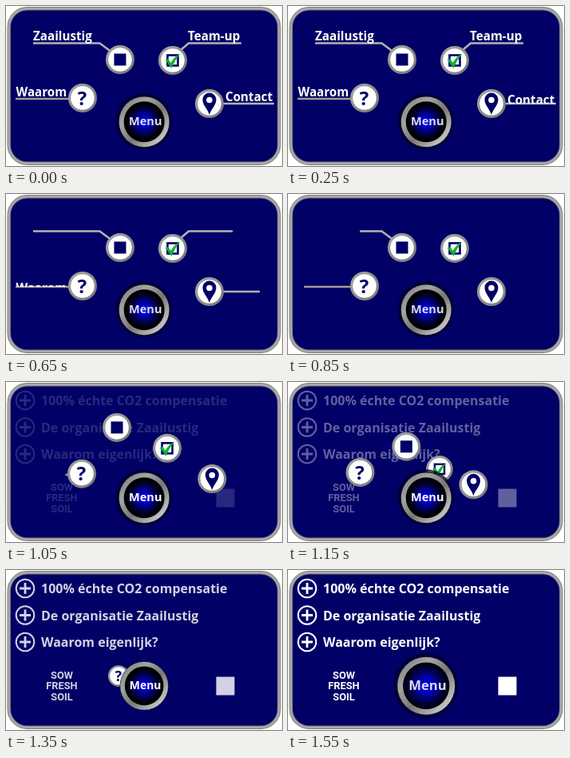
These frames come from a looping animation (346x200 px, 1600 ms). An HTML page:

```html
<!DOCTYPE html>
<html lang="nl">
<head>
<meta charset="utf-8">
<title>Menu</title>
<style>
html, body { margin: 0; width: 100%; height: 100%; overflow: hidden; background: #fff; }
svg { display: block; width: 100%; height: 100%; }
text { font-family: "Open Sans", "Noto Sans", sans-serif; font-weight: 700; fill: #fff; }
.label { font-size: 15.2px; }
.row { font-size: 16px; }
.motto { font: 700 12.8px Roboto, sans-serif; text-anchor: middle; }
.line { fill: none; stroke: #b2b2b2; stroke-width: 2.6; stroke-dasharray: 1 2; }
.navy { fill: #000066; }
</style>
</head>
<body>
<svg viewBox="0 0 346 200">
  <defs>
    <linearGradient id="rim" x1="0" y1="0" x2="1" y2="1">
      <stop offset="0" stop-color="#a8a8a8"/><stop offset="1" stop-color="#777"/>
    </linearGradient>
    <linearGradient id="steel" x1="0" y1="0" x2="1" y2="1">
      <stop offset="0" stop-color="#777"/><stop offset=".3" stop-color="#a4a4a4"/>
      <stop offset=".55" stop-color="#777"/><stop offset=".85" stop-color="#c4c4c4"/>
      <stop offset="1" stop-color="#888"/>
    </linearGradient>
    <radialGradient id="glow">
      <stop offset="0" stop-color="#0000f0"/><stop offset=".3" stop-color="#0000c4"/>
      <stop offset=".65" stop-color="#000058"/><stop offset="1" stop-color="#000008"/>
    </radialGradient>
  </defs>

  <rect x="3.7" y="3.2" width="338.6" height="193.6" rx="23" fill="#000066" stroke="#7c7c7c" stroke-width="4.4"/>
  <rect x="3.7" y="3.2" width="338.6" height="193.6" rx="23" fill="none" stroke="#aaa" stroke-width="2.4"/>

  <g id="panel">
    <g id="rows"></g>
    <text class="motto" x="70" y="136">SOW</text>
    <text class="motto" x="70" y="149.4">FRESH</text>
    <text class="motto" x="70" y="162.8">SOIL</text>
    <rect x="263.5" y="133.5" width="23" height="23" fill="#fff"/>
  </g>

  <g id="labels"></g>
  <g id="icons"></g>

  <g id="button">
    <circle id="halo" cx="-.5" cy="-.5" r="35.3" fill="#00002c"/>
    <circle r="32" fill="#222"/>
    <circle r="31.4" fill="url(#steel)"/>
    <circle r="25.5" fill="#000"/>
    <circle id="light" r="22" fill="url(#glow)"/>
    <text id="word" x="1.5" y="4.2" font-size="14.6" text-anchor="middle">Menu</text>
  </g>
</svg>
<script>
const LOOP = 1600, STEP = 50, HUB = { x: 173.2, y: 144.8 };
const $ = id => document.getElementById(id);
const clamp = v => Math.max(0, Math.min(1, v));
const span = (t, start, length) => clamp((t - start) / length);

const box = '<rect class="navy" x="-7.5" y="-7.5" width="15" height="15"/>';
const check = '<rect x="-6.5" y="-6.5" width="13" height="13" fill="none" stroke="#000066" stroke-width="2.6"/>' +
  '<path d="M-9.5-.5L-5.5-2L-2.5 3Q2-5 9.5-8.5Q3-1-1.5 10Q-5 4-9.5-.5Z" fill="#10b030"/>';
const pin = '<path class="navy" d="M0 14C-2 7-8.5 2-8.5-5A8.5 8.5 0 0 1 8.5-5C8.5 2 2 7 0 14Z"/>' +
  '<circle cy="-4.5" r="3.8" fill="#fff"/>';
const query = '<text class="navy" x="-.5" y="8.7" font-size="24" text-anchor="middle">?</text>';

// sink: label drops behind its line; pull: line retracts; go: icon leaves
const items = [
  { text: 'Zaailustig', x: 34, y: 42.5, cut: 47, line: 'M34 46.5H117.5L131 56.5',
    cx: 143, cy: 67, art: box, sink: 240, pull: 727, length: 220, go: 950 },
  { text: 'Team-up', x: 228, y: 42.5, cut: 47, line: 'M295 46.5H229L219 55',
    cx: 209, cy: 68, art: check, sink: 230, pull: 620, length: 220, go: 845 },
  { text: 'Contact', x: 275, y: 119.3, cut: 122, line: 'M336 122H272',
    cx: 255, cy: 122, art: pin, sink: 170, pull: 590, length: 215, go: 920 },
  { text: 'Waarom', x: 12.5, y: 112.5, cut: 116, line: 'M12 116H79', tint: '#a19c94',
    cx: 96, cy: 115, art: query, sink: 425, pull: 820, length: 247, go: 1030 }
];

$('rows').innerHTML = ['100% échte CO2 compensatie', 'De organisatie Zaailustig', 'Waarom eigenlijk?']
  .map((text, i) => {
    const y = 23 + i * 33.5;
    return `<g fill="none" stroke="#fff"><circle cx="24" cy="${y}" r="11.3" stroke-width="2"/>
      <path d="M17 ${y}h14M24 ${y - 7}v14" stroke-width="2.8"/></g>
      <text class="row" x="44" y="${y + 6}">${text}</text>`;
  }).join('');

$('labels').innerHTML = items.map((it, i) =>
  `<clipPath id="clip${i}"><rect x="0" y="${it.cut - 24}" width="346" height="24"/></clipPath>
   <path id="line${i}" class="line" pathLength="1" d="${it.line}" style="stroke:${it.tint || '#b2b2b2'}"/>
   <g clip-path="url(#clip${i})"><text id="label${i}" class="label" x="${it.x}">${it.text}</text></g>`).join('');

$('icons').innerHTML = items.map((it, i) =>
  `<g id="icon${i}"><circle r="18" fill="url(#rim)"/><circle r="14.8" fill="#fff"/>${it.art}</g>`).join('');

// a short move outward, then a rush to the hub
function approach(ms) {
  if (ms <= 0) return 0;
  if (ms < 100) return -.13 * (1 - Math.cos(Math.PI * ms / 100)) / 2;
  const u = clamp((ms - 100) / 330);
  return -.13 + 1.13 * (.85 * u + .15 * u * u);
}

function draw(t) {
  items.forEach((it, i) => {
    const sunk = span(t, it.sink, 350), pulled = span(t, it.pull, it.length);
    const label = $('label' + i), line = $('line' + i), icon = $('icon' + i);
    label.setAttribute('y', it.y + 16 * sunk);
    label.style.display = sunk < 1 ? '' : 'none';
    line.style.strokeDashoffset = -pulled;
    line.style.display = pulled < 1 ? '' : 'none';
    const k = 1 - approach(t - it.go), size = 1 - span(t - it.go, 300, 75);
    icon.setAttribute('transform',
      `translate(${HUB.x + (it.cx - HUB.x) * k} ${HUB.y + (it.cy - HUB.y) * k}) scale(${size})`);
    icon.style.display = size > 0 ? '' : 'none';
  });
  $('panel').setAttribute('opacity', span(t, 980, 450));

  // the button dips, then swells
  const dip = span(t, 1150, 200), swell = span(t, 1350, 200);
  const busy = t >= 950 && t < 1450;
  $('button').setAttribute('transform',
    `translate(${HUB.x} ${HUB.y}) scale(${1 - .045 * dip + .19 * swell})`);
  $('halo').setAttribute('opacity', .75 * (1 - dip + swell));
  $('light').setAttribute('r', 22 + 3 * swell);
  $('word').style.fill = busy ? '#fff' : '#dcdce8';
}

const begin = performance.now();
function tick() {
  const t = (performance.now() - begin) % LOOP;
  draw(Math.floor(t / STEP) * STEP);
  requestAnimationFrame(tick);
}
draw(0);
requestAnimationFrame(tick);
</script>
</body>
</html>
```
